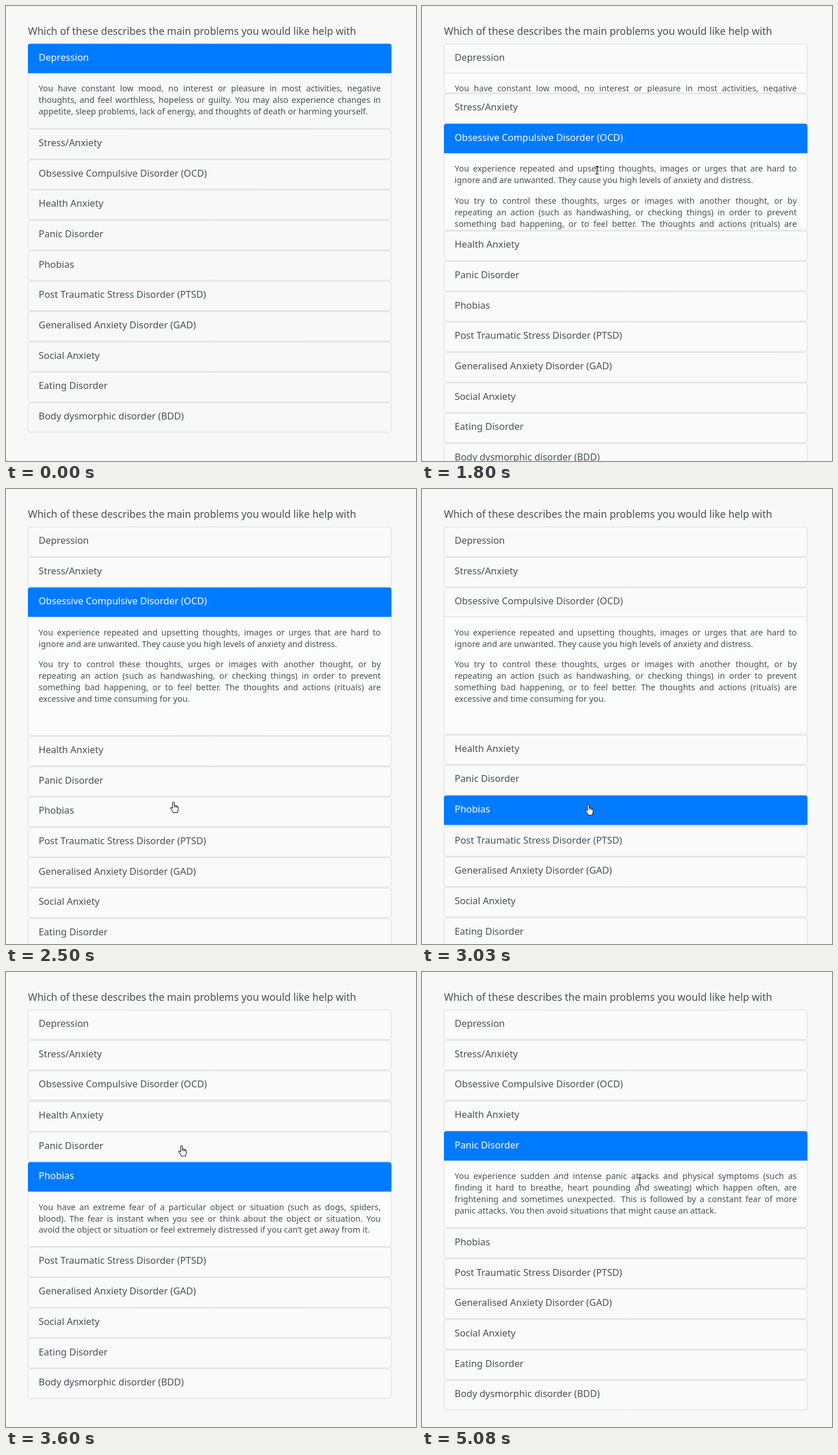
An HTML page with a canvas that plays this animation: 710x789 px, repeating every 5160 ms.

```html
<!DOCTYPE html>
<html lang="en">
<head>
<meta charset="utf-8">
<title>Accordion</title>
<style>
html, body { margin: 0; width: 100%; height: 100%; overflow: hidden; background: #f8f8f8; }
canvas { display: block; width: 710px; height: 789px; }
</style>
</head>
<body>
<canvas id="stage"></canvas>
<script>
const W = 710, H = 789, LOOP = 5160, OPEN_MS = 640;
const LEFT = 38, WIDTH = 629.5, TOP = 65.4, PITCH = 52.67, HEAD = 51;
const TEXT_X = 56.5, TEXT_W = 592.5, LINE = 19.9, FIRST_LINE = 78;
const INK = '#495057', BLUE = '#007bff', EDGE = '#dbdbdb';
const FONT = '"Noto Sans", "Open Sans", sans-serif';

const canvas = document.getElementById('stage');
const ctx = canvas.getContext('2d');
const ratio = window.devicePixelRatio || 1;
canvas.width = W * ratio;
canvas.height = H * ratio;

// Each body is a list of paragraphs, each paragraph a list of lines.
const cards = [
  { name: 'Depression', size: 95.33, body: [[
    'You have constant low mood, no interest or pleasure in most activities, negative',
    'thoughts, and feel worthless, hopeless or guilty. You may also experience changes in',
    'appetite, sleep problems, lack of energy, and thoughts of death or harming yourself.']] },
  { name: 'Stress/Anxiety' },
  { name: 'Obsessive Compulsive Disorder (OCD)', size: 205, body: [[
    'You experience repeated and upsetting thoughts, images or urges that are hard to',
    'ignore and are unwanted. They cause you high levels of anxiety and distress.'], [
    'You try to control these thoughts, urges or images with another thought, or by',
    'repeating an action (such as handwashing, or checking things) in order to prevent',
    'something bad happening, or to feel better. The thoughts and actions (rituals) are',
    'excessive and time consuming for you.']] },
  { name: 'Health Anxiety' },
  { name: 'Panic Disorder', size: 115.5, body: [[
    'You experience sudden and intense panic attacks and physical symptoms (such as',
    'finding it hard to breathe, heart pounding and sweating) which happen often, are',
    'frightening and sometimes unexpected.\u00a0 This is followed by a constant fear of more',
    'panic attacks. You then avoid situations that might cause an attack.']] },
  { name: 'Phobias', size: 95, body: [[
    'You have an extreme fear of a particular object or situation (such as dogs, spiders,',
    'blood). The fear is instant when you see or think about the object or situation. You',
    'avoid the object or situation or feel extremely distressed if you can\u2019t get away from it.']] },
  { name: 'Post Traumatic Stress Disorder (PTSD)' },
  { name: 'Generalised Anxiety Disorder (GAD)' },
  { name: 'Social Anxiety' },
  { name: 'Eating Disorder' },
  { name: 'Body dysmorphic disorder (BDD)' }
];

const switches = [
  { at: 1549, from: 0, to: 2 },
  { at: 3016, from: 2, to: 5 },
  { at: 4346, from: 5, to: 4 }
];

// Bursts of movement: first step, last step, number of steps.
const bursts = [
  [0, 0, 1], [70, 540, 7], [610, 850, 4], [1550, 2030, 7], [2100, 2580, 7],
  [2640, 2710, 2], [2860, 2860, 1], [3030, 3520, 7], [3600, 3970, 6],
  [4360, 4850, 7], [4910, 5080, 3]
];

// Pointer path: time, x, y.
const path = [
  [70, 412, 741], [540, 305, 338], [850, 303, 284], [2030, 303, 285],
  [2100, 302, 290], [2580, 289, 563], [2710, 288, 546], [2860, 287, 538],
  [3030, 288, 547], [3150, 288, 547], [3600, 304, 301], [3970, 288, 296],
  [4450, 288, 296], [4850, 377, 363]
];

function stepTime(t) {
  const [start, end, n] = bursts.filter(b => b[0] <= t).pop();
  if (n === 1) return start;
  const gap = (end - start) / (n - 1);
  return start + gap * Math.min(n - 1, Math.floor((t - start) / gap + 0.2));
}

// cubic-bezier(.25, .1, .25, 1)
function ease(x) {
  if (x <= 0) return 0;
  if (x >= 1) return 1;
  const curve = (a, b, s) => 3 * a * s * (1 - s) ** 2 + 3 * b * s * s * (1 - s) + s ** 3;
  let lo = 0, hi = 1;
  for (let i = 0; i < 24; i++) {
    const mid = (lo + hi) / 2;
    if (curve(0.25, 0.25, mid) < x) lo = mid; else hi = mid;
  }
  return curve(0.1, 1, lo);
}

function layout(t) {
  const sw = switches.filter(s => s.at <= t).pop();
  const p = sw ? ease((t - sw.at) / OPEN_MS) : 0;
  const active = sw ? sw.to : 0;
  let y = TOP;
  return cards.map((card, i) => {
    let part = 0;
    if (i === active) part = sw ? p : 1;
    else if (sw && i === sw.from) part = 1 - p;
    const open = (card.size || 0) * part;
    const box = { card, y, open, active: i === active, bottom: y + PITCH - 0.6 + open };
    y += PITCH + open;
    return box;
  });
}

function lineCentres(box) {
  const list = [];
  let y = box.y + FIRST_LINE;
  for (const para of box.card.body || []) {
    para.forEach((text, i) => {
      list.push({ text, y, last: i === para.length - 1 });
      y += LINE;
    });
    y += 15.6;
  }
  return list;
}

function drawLine({ text, y, last }) {
  if (last) {
    ctx.fillText(text, TEXT_X, y + 5);
    return;
  }
  const words = text.split(' ');
  const widths = words.map(w => ctx.measureText(w).width);
  const gap = (TEXT_W - widths.reduce((a, b) => a + b)) / (words.length - 1);
  let x = TEXT_X;
  words.forEach((word, i) => {
    ctx.fillText(word, x, y + 5);
    x += widths[i] + gap;
  });
}

function roundBox(y, h, radii) {
  ctx.beginPath();
  ctx.roundRect(LEFT, y, WIDTH, h, radii);
}

function drawCard(box, fill, bodyFill) {
  const { card, y, open, active, bottom } = box;
  ctx.save();
  roundBox(y, bottom - y, 4);
  ctx.fillStyle = fill;
  ctx.fill();
  ctx.clip();
  if (open > 0) {
    ctx.fillStyle = bodyFill;
    ctx.fillRect(LEFT, y + HEAD, WIDTH, bottom - y - HEAD);
    ctx.fillStyle = EDGE;
    ctx.fillRect(LEFT, y + HEAD - 0.6, WIDTH, 1);
    ctx.fillStyle = INK;
    ctx.font = '14.4px ' + FONT;
    lineCentres(box).forEach(drawLine);
  }
  ctx.restore();

  ctx.beginPath();
  ctx.roundRect(LEFT + 0.3, y + 0.5, WIDTH - 0.8, bottom - y - 1, 3.5);
  ctx.strokeStyle = EDGE;
  ctx.lineWidth = 1;
  ctx.stroke();

  if (active) {
    roundBox(y, HEAD, [4, 4, 0, 0]);
    ctx.fillStyle = BLUE;
    ctx.fill();
  }
  ctx.fillStyle = active ? '#fff' : INK;
  ctx.font = '16.4px ' + FONT;
  ctx.fillText(card.name, TEXT_X, y + 29.6);
}

function pointerAt(t) {
  const i = path.findIndex(k => k[0] > t);
  if (i === 0) return null;
  if (i < 0) return path[path.length - 1].slice(1);
  const [t0, x0, y0] = path[i - 1], [t1, x1, y1] = path[i];
  const u = (t - t0) / (t1 - t0), s = u * u * (3 - 2 * u);
  return [x0 + (x1 - x0) * s, y0 + (y1 - y0) * s];
}

function pointerKind(y, boxes) {
  const box = boxes.find(b => y >= b.y && y < b.y + PITCH + b.open);
  if (!box) return 'arrow';
  if (y < box.y + HEAD || !box.open) return 'hand';
  return lineCentres(box).some(l => Math.abs(l.y - y) < LINE / 2) ? 'beam' : 'arrow';
}

const shapes = {
  hand: new Path2D('M-1.5 1Q0-.6 1.5 1V6Q3 5 4 6.7Q5.5 6 6.3 7.5Q8 7 8.2 9V13Q8 15 6.8 18.3H-.5Q-1 16-4.5 11.5Q-5.5 9.5-4 9.5Q-2.8 9.5-1.5 11Z'),
  fingers: new Path2D('M1.5 6V9.5M4 6.7V9.7M6.3 7.5V10'),
  arrow: new Path2D('M.5 .5V13.5L3.4 10.8L5.4 15.6L7.6 14.7L5.6 10H9.7Z'),
  beam: new Path2D('M-3-6.5H-1Q0-6.5 0-5.5Q0-6.5 1-6.5H3M0-5.5V5.5M-3 6.5H-1Q0 6.5 0 5.5Q0 6.5 1 6.5H3')
};

function drawPointer([x, y], kind) {
  ctx.save();
  ctx.translate(x, y);
  ctx.lineJoin = 'round';
  ctx.strokeStyle = '#1c1c22';
  ctx.lineWidth = 1.1;
  if (kind !== 'beam') {
    ctx.fillStyle = '#fff';
    ctx.fill(shapes[kind]);
  }
  ctx.stroke(shapes[kind]);
  if (kind === 'hand') ctx.stroke(shapes.fingers);
  ctx.restore();
}

function draw(now) {
  const t = stepTime(now % LOOP);
  const boxes = layout(t);
  const started = t >= switches[0].at;
  ctx.setTransform(ratio, 0, 0, ratio, 0, 0);
  ctx.fillStyle = '#f8f8f8';
  ctx.fillRect(0, 0, W, H);
  ctx.fillStyle = INK;
  ctx.font = '17.52px ' + FONT;
  ctx.fillText('Which of these describes the main problems you would like help with', LEFT, 49.5);
  for (const box of boxes) {
    drawCard(box, started ? '#fafafa' : '#f8f8f8', started ? '#fcfcfc' : '#f8f8f8');
  }
  const spot = pointerAt(t);
  if (spot) drawPointer(spot, pointerKind(spot[1], boxes));
}

const begin = performance.now();
function tick() {
  draw(performance.now() - begin);
  requestAnimationFrame(tick);
}
tick();
</script>
</body>
</html>
```
